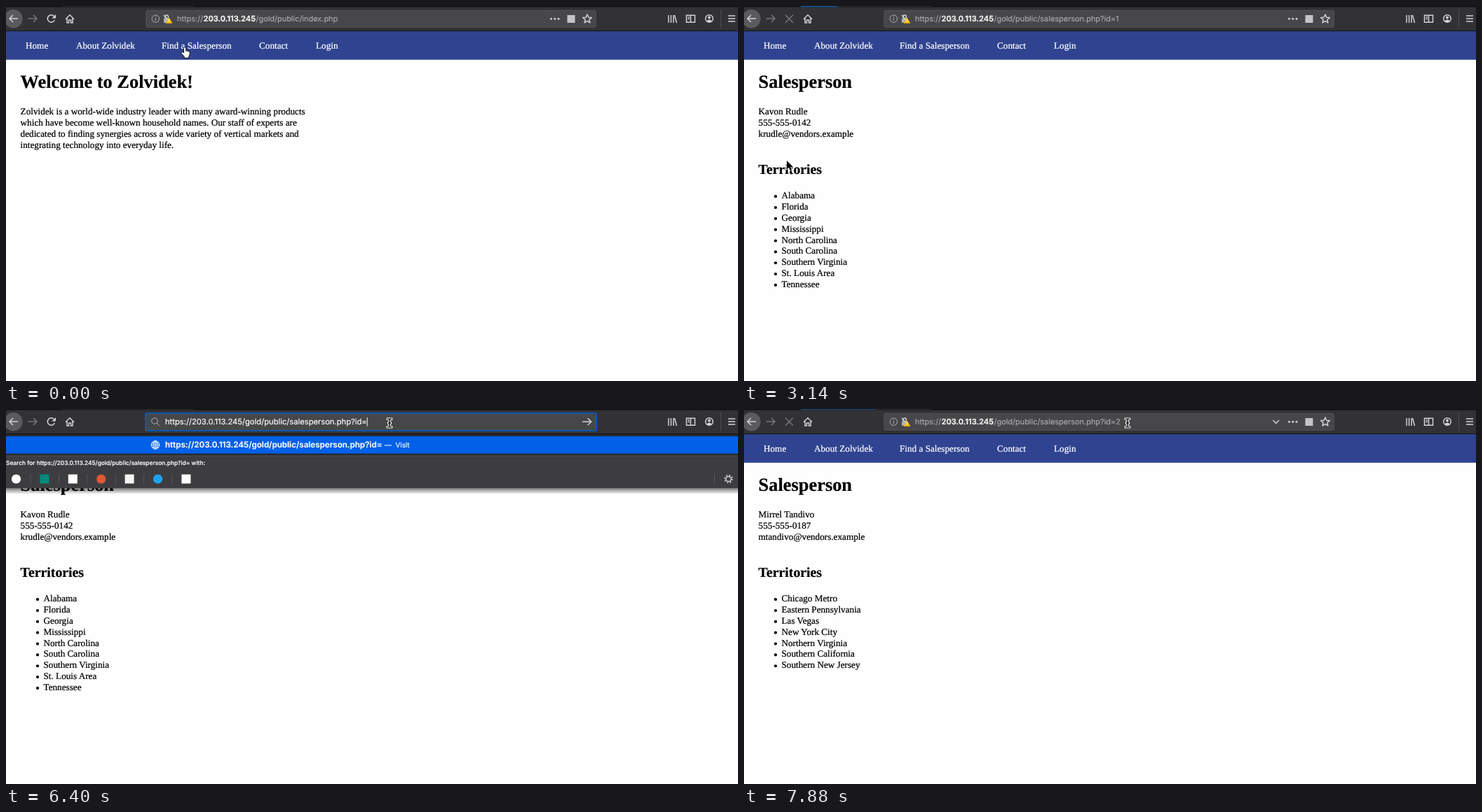
Write an HTML page that moves like this. It is 1044 by 536 pixels and loops after 8000 ms.

```html
<!DOCTYPE html>
<html lang="en">
<head>
<meta charset="utf-8">
<title>Browsing the sales directory</title>
<style>
html, body { margin: 0; width: 100%; height: 100%; overflow: hidden; background: #fefefe; }
svg { display: block; }
text {
  font: 13.2px "Liberation Serif", serif; text-rendering: geometricPrecision; white-space: pre;
  color: #000; fill: currentColor; stroke: currentColor; stroke-width: .22px;
}
.h1 { font-size: 26.4px; font-weight: bold; }
.h2 { font-size: 19.8px; font-weight: bold; }
.b { font-weight: bold; }
.nav { color: #fff; }
.link { color: #00e; text-decoration: underline; }
.ui, .title, .top, .small, .hint { font-family: Inter, sans-serif; color: #f9f9fa; }
.ui { font-size: 11.2px; }
.dim { color: #a5a5a8; }
.address { font-size: 10.95px; }
.host { font-size: 11.1px; font-weight: 600; }
.title { font-size: 11.15px; }
.top { font-size: 11.6px; font-weight: 600; }
.small { font-size: 9.9px; }
.hint { font-size: 8.35px; font-weight: 500; }
.blue { color: #1a9cf0; }
.match { font-weight: 600; }
.green { color: #16e016; }
.line { fill: none; stroke: #d2d2d4; stroke-width: 1.5; }
.off { stroke: #77777a; }
.thin { stroke-width: 1; stroke: #b1b1b3; }
.bright { stroke: #fff; }
</style>
</head>
<body>
<svg id="stage" width="1044" height="536"></svg>
<script>
const LOOP = 8000, LINE = 15.84;
const stage = document.getElementById('stage');
const HOST = '203.0.113.245', DIR = '/gold/public/', PERSON = 'salesperson.php?id=';
const PERSON_URL = 'https://' + HOST + DIR + PERSON;
const FILES = ['index.php', 'territories.php', PERSON + 1, PERSON + 2];
const LOADS = [150, 2840, 7440];

const text = (x, y, s, cls = '') => `<text x="${x}" y="${y}" class="${cls}">${s}</text>`;
const rect = (x, y, w, h, fill, more = '') =>
  `<rect x="${x}" y="${y}" width="${w}" height="${h}" fill="${fill}" ${more}/>`;
const disc = (x, y, r, fill) => `<circle cx="${x}" cy="${y}" r="${r}" fill="${fill}"/>`;
const ring = (x, y, r, cls = '') => `<circle cx="${x}" cy="${y}" r="${r}" class="line ${cls}"/>`;
const line = (d, cls = '') => `<path d="${d}" class="line ${cls}"/>`;
const lines = (x, y, list, cls) => list.map((s, i) => text(x, y + i * LINE, s, cls)).join('');

const SELLERS = [
  { name: 'Kavon Rudle', phone: '555-555-0142', mail: 'krudle@vendors.example',
    areas: ['Alabama', 'Florida', 'Georgia', 'Mississippi', 'North Carolina', 'South Carolina',
      'Southern Virginia', 'St. Louis Area', 'Tennessee'] },
  { name: 'Mirrel Tandivo', phone: '555-555-0187', mail: 'mtandivo@vendors.example',
    areas: ['Chicago Metro', 'Eastern Pennsylvania', 'Las Vegas', 'New York City',
      'Northern Virginia', 'Southern California', 'Southern New Jersey'] }
];

// Entries starting with "@" are links, "-" marks a bulleted region
const STATES = [
  ['Alabama (AL)', '@Kavon Rudle'],
  ['Alaska (AK)', '@Galbet Nomiston'],
  ['Arizona (AZ)', '@Jelva Dorint'],
  ['Arkansas (AR)', '@Talirelda Ulden'],
  ['California (CA)', '-Northern California', '@Galbet Nomiston', '-Southern California', '@Mirrel Tandivo'],
  ['Colorado (CO)', '@Jelva Dorint'],
  ['Connecticut (CT)']
];

function homePage() {
  return text(20.6, 117, 'Welcome to Zolvidek!', 'h1') + lines(20.6, 155, [
    'Zolvidek is a world-wide industry leader with many award-winning products',
    'which have become well-known household names. Our staff of experts are',
    'dedicated to finding synergies across a wide variety of vertical markets and',
    'integrating technology into everyday life.']);
}

function listPage() {
  let out = text(20.6, 117, 'Find a Salesperson', 'h1') +
    text(20.6, 155, 'Use the list below to find a salesperson nearby. We are ready to serve you!') +
    text(20.6, 184, 'UNITED STATES', 'b');
  let y = 213.2;
  for (const [state, ...items] of STATES) {
    out += text(20.6, y, state);
    items.forEach((item, i) => {
      y += LINE;
      const link = item[0] === '@';
      if (!link || i === 0) out += rect(43, y - 5.4, 4.4, 4.4, '#000');
      out += text(53.5, y, item.slice(1), link ? 'link' : '');
    });
    y += LINE + 13.2;
  }
  return out;
}

function sellerPage({ name, phone, mail, areas }) {
  return text(20.6, 117, 'Salesperson', 'h1') + lines(20.6, 155, [name, phone, mail]) +
    text(20.6, 240, 'Territories', 'h2') + lines(53.5, 275.2, areas) +
    areas.map((_, i) => disc(45, 272.2 + i * LINE, 2.1, '#000')).join('');
}

const pages = [homePage(), listPage(), ...SELLERS.map(sellerPage)];

const navBar = rect(0, 36, 1044, 40.8, '#2f4390') +
  [[28, 'Home'], [100, 'About Zolvidek'], [222, 'Find a Salesperson'], [361, 'Contact'], [442, 'Login']]
    .map(([x, s]) => text(x, 60.6, s, 'nav')).join('');

const starPoints = Array.from({ length: 10 }, (_, i) => {
  const a = i * Math.PI / 5, r = i % 2 ? 3 : 6.6;
  return `${829 + r * Math.sin(a)} ${18.6 - r * Math.cos(a)}`;
});

const chrome = rect(0, 0, 1044, 36, '#323234') + rect(0, 0, 1044, 1.5, '#0e0e10') +
  rect(81, 0, 186, 1, '#2c2c2f') + rect(0, 35, 1044, 1, '#111113') +
  disc(10.5, 18.2, 13.2, '#5b5b5e') + line('M17 18H5M10 13L5 18l5 5') +
  line('M31.5 18H44M39 13l5 5-5 5', 'off') +
  line('M85 18.8l6-6 6 6M87 17.5v6.5h2.5v-4h3v4h2.5v-6.5') +
  line('M945 13v11M948.5 13v11M952 13v11M953.5 13l3 11') +
  line('M970.5 13.2h12v10h-12zM976.5 13v10M972.5 16h2.5M972.5 18.5h2.5') +
  ring(1003, 18, 5.3) + disc(1003, 16.5, 2, '#d2d2d4') +
  '<path d="M999.3 21.5q3.7-4 7.4 0-3.7 3.4-7.4 0" fill="#d2d2d4"/>' +
  rect(1019, 5, 1, 26, '#4c4c4f') + line('M1030 14h10M1030 18h10M1030 22h10');

const reloadIcon = line('M69.3 20a5.2 5.2 0 1 1-.9-5.4') + '<path d="M71 12v5.6h-5.6z" fill="#d2d2d4"/>';
const stopIcon = line('M59 12.8l11 11M70 12.8l-11 11', 'off');
const siteIcons = ring(213.3, 18.2, 5.2, 'thin') + line('M213.3 17.3v3.7M213.3 15v1.2', 'thin') +
  rect(225, 17.5, 8, 6.5, '#b1b1b3', 'rx="1"') + line('M227 17.5v-2.3a2.2 2.2 0 0 1 4.4 0v2.3') +
  line('M225 13l9 10') + '<path d="M232.6 16.5l4.8 8.3h-9.6z" fill="#ffbf00"/>' + rect(232.1, 19, 1, 3.6, '#fff');
const pageActions = [777.5, 782.8, 788].map(x => disc(x, 18.2, 1.5, '#d2d2d4')).join('') +
  rect(800.5, 13, 11, 11, '#c4c4c6') + `<path d="M${starPoints.join('L')}z" class="line" stroke-linejoin="round"/>`;

const globe = (y, cls = '') => ring(213, y, 5.8, 'thin ' + cls) +
  line(`M207.2 ${y}h11.6M213 ${y - 5.8}v11.6M208.5 ${y - 3}h9M208.5 ${y + 3}h9`, 'thin ' + cls) +
  `<ellipse cx="213" cy="${y}" rx="2.9" ry="5.8" class="line thin ${cls}"/>`;

function addressBar(t, page, hover) {
  const focused = t >= 5210 && t < 7440, typing = focused && t >= 6250;
  let out = focused
    ? rect(199, 6, 643, 25, '#474749', 'rx="2" stroke="#0b58ae" stroke-width="2"')
    : rect(199.8, 6.3, 641.6, 24, '#474749', 'rx="2" stroke="#58585b" stroke-width=".8"');
  if (typing) {
    out += ring(212, 17, 4.3, 'thin') + line('M215 20l4.2 4.2', 'thin') + line('M822 18.2h12.5M829.7 13.4l5 4.8-5 4.8');
  } else {
    out += siteIcons + pageActions;
    if (hover || focused) out += line('M754.5 16l4.3 4.5 4.3-4.5');
  }
  if (!focused)
    return out + text(244, 22.4, 'https://', 'ui address dim') + text(281.5, 22.4, HOST, 'ui host') +
      text(356.5, 22.4, DIR + FILES[page], 'ui address dim');
  const value = PERSON_URL + (typing ? (t < 6550 ? '' : 2) : 1);
  if (t < 5810) out += rect(244, 11.5, 0, 14, '#4a7198', 'id="selection"');
  out += `<text id="field" class="ui" x="${typing ? 227 : 244}" y="22.4">${value}</text>`;
  if (t >= 5810 && t < 6690) out += rect(0, 12, 1, 12.6, '#f9f9fa', 'id="caret"');
  return out;
}

function dropdown(t) {
  const rows = t >= 6690 && t < 7140 ? 4 : 1;
  const id = t < 6550 ? '' : '2';
  const top = 67 + (rows - 1) * 24.8;
  const rowY = i => 51.4 + i * 24.8;
  let out = rect(0, 36, 1044, top - 36, '#2a2a2e') + rect(0, 39, 1044, 24.6, '#0060e8') +
    globe(rowY(0), 'bright') + text(227, 55.4, PERSON_URL + id, 'top') +
    text(id ? 547.5 : 540, 55.2, '—  Visit', 'small');
  if (rows > 1) {
    [[SELLERS[1].name, PERSON_URL + 2, 381, 'blue match'],
     [SELLERS[0].name, 'Switch to Tab', 369, 'green'],
     [SELLERS[0].name, PERSON_URL + "' OR SLEEP(5)=0--'", 369, 'blue']].forEach(([name, note, x, cls], i) => {
      const y = rowY(i + 1);
      out += globe(y) + text(227, y + 3.8, 'Salesperson: ' + name, 'title') +
        text(x, y + 3.8, '—', 'small dim') + text(x + 15, y + 3.8, note, 'small ' + cls);
    });
    out += rect(190.5, 96.5, 9, 6.5, '#8b8b8e', 'rx="1"') + rect(188.5, 103.5, 13, 1.6, '#8b8b8e');
  }
  out += rect(0, top, 1044, 46.4, '#3d3d40') + rect(0, top - .5, 1044, 1, '#55555a') +
    text(0, top + 13, `Search for ${PERSON_URL + id} with:`, 'hint');
  ['#fff', '#00897b', '#fff', '#de5833', '#f5f5f5', '#1da1f2', '#fff'].forEach((color, i) => {
    const x = 14.5 + i * 40.4, y = top + 33;
    out += i % 2 && i > 1 || !i ? disc(x, y, 6.6, color) : rect(x - 6.5, y - 6.5, 13, 13, color);
    if (i < 6) out += rect(x + 20, y - 7, 1, 14, '#58585b');
  });
  return out + rect(1010, top + 26, 1, 15, '#58585b') + ring(1030.5, top + 33, 3.6) +
    `<circle cx="1030.5" cy="${top + 33}" r="5.4" class="line" stroke-dasharray="2.1 2.14"/>` +
    rect(0, top + 46.4, 1044, 8.4, 'url(#shade)');
}

// Path, offset from the hot spot, fill, outline, outline width
const cursors = {
  hand: ['M4 8V1.4q0-1.2 1.1-1.2T6.2 1.4V5.6q1-.9 2 .2 1-.7 1.9.4 1.8-.2 1.8 1.5 0 3-1.6 5v2H4.6v-1.6Q3 11.5.6 8.4q-.5-1.3.8-1.5Q2.5 6.8 4 8.6z', -7, 2, '#fff', '#000', 1.4],
  arrow: ['M0 0V12.5l2.9-2.7 2 4.6 2.2-1-2-4.5h3.9z', 0, 0, '#000', '#fff', 1.4],
  beam: ['M-3.3-6.6h2.6l.7.7.7-.7h2.6v1.3H.7V-.7H2v1.4H.7v4.6h2.6v1.3H.7L0 5.9l-.7.7h-2.6V5.3h2.6V.7H-2V-.7h1.3v-4.6h-2.6z', 0, 0, '#000', '#fff', 2]
};

// Pointer travel: start, end, number of stepped positions, destination
const MOVES = [[1950, 2540, 5, 61, 221], [3430, 3870, 4, 345, 104], [4470, 5060, 5, 547, 20]];

function pointer(t, page) {
  let x = 257, y = 57;
  for (const [start, end, n, toX, toY] of MOVES) {
    if (t < start) break;
    const k = Math.min(1, (1 + Math.floor((t - start) / (end - start) * (n - 1) + .02)) / n);
    const p = k * k * (3 - 2 * k);
    x += (toX - x) * p;
    y += (toY - y) * p;
  }
  const onLink = t < 1950 || (page === 1 && t >= 2540);
  return { x, y, kind: onLink ? 'hand' : y < 32 ? 'beam' : 'arrow' };
}

function draw(t) {
  const page = LOADS.filter(s => t >= s + 150).length;
  const since = t - Math.max(-9999, ...LOADS.filter(s => t >= s));
  const { x, y, kind } = pointer(t, page);
  let out = '<defs><linearGradient id="shade" x2="0" y2="1"><stop stop-opacity=".5"/><stop offset="1" stop-opacity="0"/></linearGradient></defs>' +
    rect(0, 0, 1044, 536, '#fefefe') + pages[page] + navBar + chrome +
    (since < 1030 ? stopIcon : reloadIcon);
  if (since >= 300 && since < 740) {
    const [w, alpha] = since < 440 ? [52, .75] : since < 590 ? [108, .45] : [186, .2];
    out += rect(81, 0, w, 1.4, '#0a74d0', `opacity="${alpha}"`);
  }
  if (page === 1 && t < 1200)
    out += rect(1036, 79, 6, 39, '#000', `rx="3" opacity="${t < 1050 ? .5 : .25}"`);
  out += addressBar(t, page, kind === 'beam');
  if (t >= 6400 && t < 7440) out += dropdown(t);
  const [d, dx, dy, fill, stroke, width] = cursors[kind];
  return out + `<path d="${d}" transform="translate(${x + dx} ${y + dy})" fill="${fill}" stroke="${stroke}" stroke-width="${width}" paint-order="stroke"/>`;
}

let shown = '';
function frame() {
  const markup = draw(performance.now() % LOOP);
  if (markup !== shown) {
    stage.innerHTML = shown = markup;
    const find = id => stage.querySelector('#' + id);
    const field = find('field'), width = field && field.getComputedTextLength();
    if (find('selection')) find('selection').setAttribute('width', width);
    if (find('caret')) find('caret').setAttribute('x', +field.getAttribute('x') + width);
  }
  requestAnimationFrame(frame);
}
frame();
</script>
</body>
</html>
```
